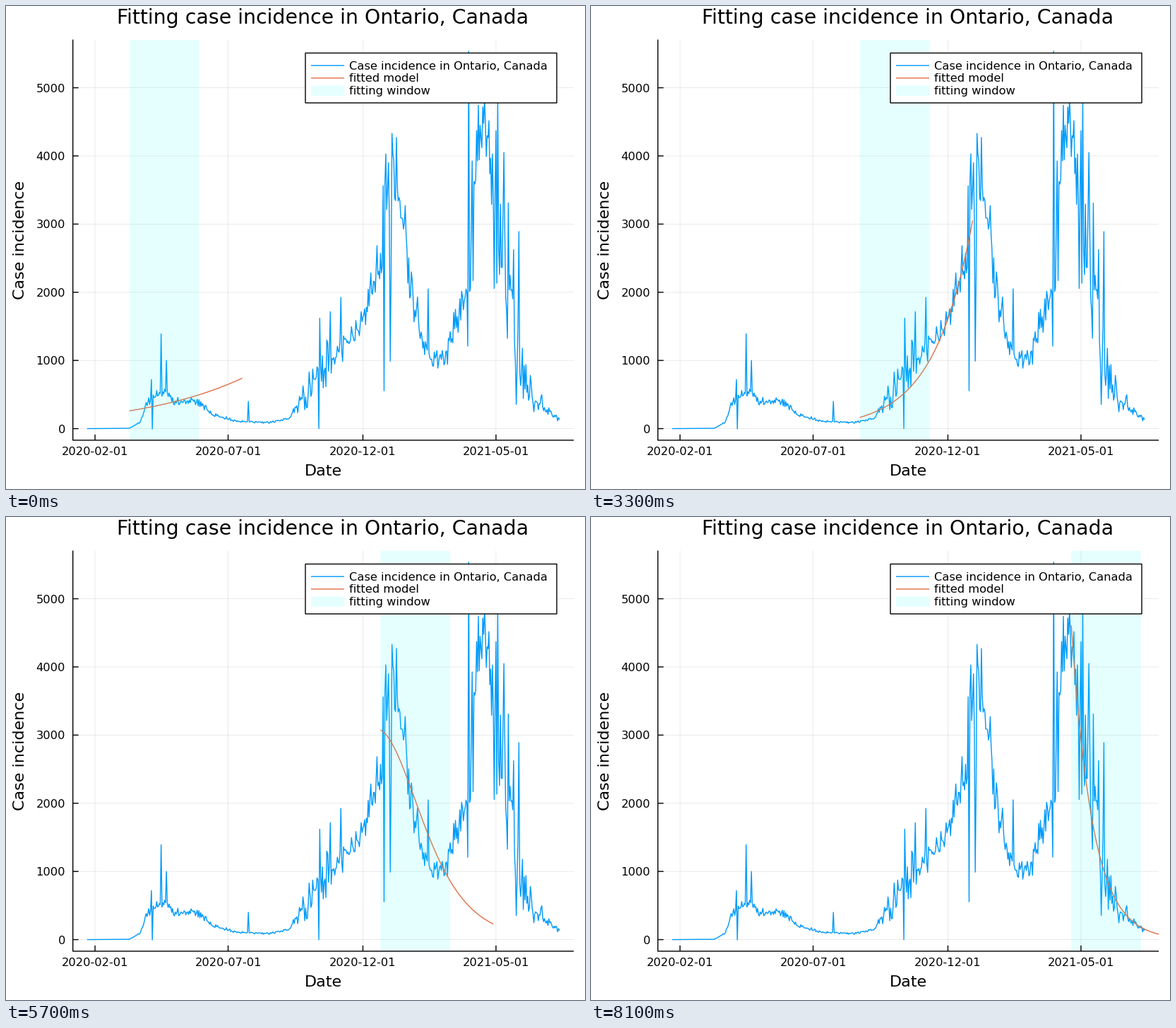
Animation, 820 px wide and 683 px high, one loop 8200 ms. Source, as a matplotlib script:

```python
import numpy as np
import matplotlib.pyplot as plt
from matplotlib.animation import FuncAnimation
from matplotlib.patches import Rectangle

W, H, DPI = 820, 683, 64
FRAMES, INTERVAL = 82, 100
LEFT, RIGHT, TOP, BOTTOM = 94.7, 804, 47.5, 614
BLUE, ORANGE = "#009AFA", "#E26F46"
FIRST_DAY, STEP, WINDOW, SPAN = 48, 5, 79, 128
LAST_DAY = 536

# Turning points of the three waves: day, typical cases
TREND = [
    (0, 0), (48, 5), (60, 90), (69, 420), (86, 540), (104, 380), (124, 430),
    (142, 210), (170, 110), (204, 85), (230, 160), (250, 600), (288, 1150),
    (306, 1400), (331, 2350), (349, 3700), (361, 2800), (371, 1850),
    (386, 1050), (407, 1050), (431, 2100), (441, 4000), (451, 4600),
    (468, 3100), (484, 1800), (492, 950), (508, 420), (LAST_DAY, 150),
]
# Stretches where the daily reports are most erratic
ERRATIC = [(237, 276), (336, 346), (434, 440), (462, LAST_DAY)]
# The few days that stand out most
OUTLIERS = {73: 720, 74: -5, 84: 1390, 90: 1000, 183: 400, 263: 0, 264: 1620,
            276: 1715, 288: 1925, 337: 555, 342: 3900, 344: 990, 346: 4330,
            351: 4270, 387: 2050, 432: 1210, 433: 5538, 435: 2070, 466: 4900,
            473: 4050, 487: 355, 490: 2890}

# Key poses of the fit: step, first value, last value, strength of the bend
POSES = [(0, 260, 740, 0), (12, 440, 45, 0), (24, 35, 2065, 0),
         (42, 770, 4510, 0), (46, 1000, 8000, 0), (57, 3075, 228, 1),
         (64, 900, 7000, 0), (72, 2030, 1020, 1), (81, 4610, 24.4, 0)]
WAVE_PEAKS, WAVE_WIDTH = (326, 455), 66


def px(size):
    return size * 72 / DPI


def x_of(day):
    return 114.85 + 1.248 * np.asarray(day)


def y_of(cases):
    return 597.6 - 0.0964 * np.asarray(cases)


def make_cases():
    rng = np.random.default_rng(7)
    days = np.arange(LAST_DAY + 1)
    spread = np.full(days.size, 0.09)
    for start, stop in ERRATIC:
        spread[start:stop] = 0.24
    noise = rng.normal(size=days.size).clip(-2, 2)
    cases = np.interp(days, *zip(*TREND)) * (1 + spread * noise)
    cases[list(OUTLIERS)] = list(OUTLIERS.values())
    return days, cases


def model(step):
    """Exponential growth or decay, bent over near the peak of a wave."""
    steps, first, last, bend = np.array(POSES).T
    log_first = np.interp(step, steps, np.log(first))
    log_last = np.interp(step, steps, np.log(last))
    peak = WAVE_PEAKS[step > 64] - FIRST_DAY - STEP * step
    t = np.arange(SPAN + 1)
    wave = -2 * np.log(np.cosh((t - peak) / WAVE_WIDTH))
    wave *= np.interp(step, steps, bend)
    sag = wave - wave[0] - (wave[-1] - wave[0]) * t / SPAN
    return np.exp(log_first + (log_last - log_first) * t / SPAN + sag)


fig = plt.figure(figsize=(W / DPI, H / DPI), dpi=DPI, facecolor="white")
ax = fig.add_axes([0, 0, 1, 1])
ax.set(xlim=(0, W), ylim=(H, 0))
ax.axis("off")
area = Rectangle((LEFT, TOP), RIGHT - LEFT, BOTTOM - TOP, fc="none", ec="none")
ax.add_patch(area)


def line(xs, ys, color="black", width=1.4, z=5, **kw):
    return ax.plot(xs, ys, color=color, lw=px(width), zorder=z, snap=False,
                   solid_capstyle="butt", **kw)[0]


def box(x, y, w, h, z, **style):
    return ax.add_patch(Rectangle((x, y), w, h, zorder=z, snap=False, **style))


def text(x, y, label, size, **kw):
    ax.text(x, y, label, fontsize=px(size), family="DejaVu Sans",
            va="baseline", zorder=9, **kw)


for day, label in [(9, "2020-02-01"), (160, "2020-07-01"),
                   (313, "2020-12-01"), (464, "2021-05-01")]:
    x = x_of(day)
    line([x, x], [TOP, BOTTOM], width=0.8, z=1, alpha=0.1)
    line([x, x], [BOTTOM, BOTTOM - 8])
    text(x, 635, label, 16.2, ha="center")
for value in range(0, 5001, 1000):
    y = y_of(value)
    line([LEFT, RIGHT], [y, y], width=0.8, z=1, alpha=0.1)
    line([LEFT, LEFT + 8], [y, y])
    text(84, y + 6, str(value), 16.2, ha="right")
line([LEFT, LEFT, RIGHT], [TOP, BOTTOM, BOTTOM])

text(449, 25, "Fitting case incidence in Ontario, Canada", 28.4, ha="center")
text(449, 664, "Date", 22.2, ha="center")
text(26, 331, "Case incidence", 22.2, ha="center", rotation=90,
     rotation_mode="anchor")

days, cases = make_cases()
line(x_of(days), y_of(cases), BLUE, z=2, solid_joinstyle="round")
fit_line = line([], [], ORANGE, z=3)
band_style = dict(fc="cyan", ec="none", alpha=0.1)
band = box(0, TOP, 1.248 * WINDOW, BOTTOM - TOP, 4, **band_style)
for artist in (fit_line, band):
    artist.set_clip_path(area)

box(424, 66.5, 356, 70.5, 7, fc="white", ec="black", lw=px(1.4))
line([432, 479], [84.2, 84.2], BLUE, z=8)
line([432, 479], [101.9, 101.9], ORANGE, z=8)
box(432, 112.5, 47.5, 14.5, 8, **band_style)
for y, label in [(90, "Case incidence in Ontario, Canada"),
                 (107.4, "fitted model"), (125, "fitting window")]:
    text(486, y, label, 16.2)


def update(step):
    start = FIRST_DAY + STEP * step
    band.set_x(x_of(start))
    fit_line.set_data(x_of(start + np.arange(SPAN + 1)), y_of(model(step)))
    return band, fit_line


anim = FuncAnimation(fig, update, frames=FRAMES, interval=INTERVAL,
                     repeat=True, repeat_delay=0, blit=False)
plt.show()
```
